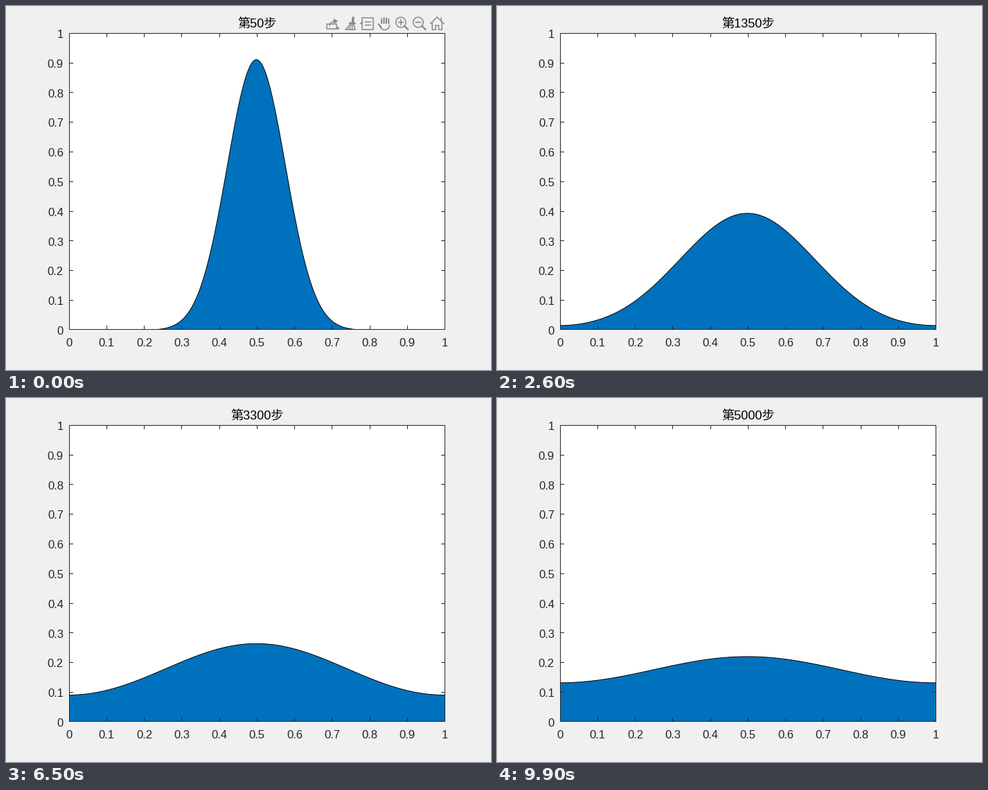
These frames come from a looping animation (700x525 px, 10000 ms). A matplotlib script:

```python
import numpy as np
import matplotlib.pyplot as plt
from matplotlib.animation import FuncAnimation
from matplotlib.patches import Arc, Circle, Polygon, Rectangle, RegularPolygon

W, H, DPI = 700, 525, 100
PX = 72 / DPI  # points per pixel
FRAMES, INTERVAL, STEPS = 100, 100, 50

# Plot box in pixels, y pointing down
LEFT, TOP, WIDTH, HEIGHT = 91, 39, 542.5, 427.875
BASE = 467.75
INK, GREY, BLUE = "#262626", "#888888", "#0072bd"

plt.rcParams["font.family"] = ["Liberation Sans", "Noto Sans CJK JP"]

fig = plt.figure(figsize=(W / DPI, H / DPI), dpi=DPI, facecolor="#f0f0f0")
ax = fig.add_axes([0, 0, 1, 1])
ax.set(xlim=(0, W), ylim=(H, 0))
ax.axis("off")


def stroke(xs, ys, color=INK, width=1, cap="butt"):
    line, = ax.plot(xs, ys, color=color, lw=width * PX, zorder=4,
                    solid_capstyle=cap, snap=False)
    return line


def label(x, y, s, size=16.67, color=INK, ha="center"):
    return ax.text(x, y, s, fontsize=size * PX, color=color, ha=ha,
                   va="baseline", zorder=5)


def draw_axes():
    x0, x1, y0, y1 = 91.5, 633.5, 39.5, 466.5
    ax.add_patch(Rectangle((LEFT, TOP), 543, 428, fc="white", ec="none",
                           zorder=1, snap=False))
    ax.add_patch(Rectangle((x0, y0), x1 - x0, y1 - y0, fc="none", ec=INK,
                           lw=PX, zorder=4, snap=False))
    for k in range(11):
        text = f"{k / 10:g}"
        tx = LEFT + WIDTH * k / 10
        ty = 467.25 - HEIGHT * k / 10
        label(tx, 491, text)
        label(83, ty + 6.7, text, ha="right")
        if 0 < k < 10:
            cx, cy = int(tx) + 0.5, int(ty) + 0.5
            for edge, d in ((y0, 5.5), (y1, -5.5)):
                stroke([cx, cx], [edge, edge + d])
            for edge, d in ((x0, 5.5), (x1, -5.5)):
                stroke([edge, edge + d], [cy, cy])


def draw_toolbar():
    """Seven evenly spaced icons, each built around its own centre."""
    parts = []
    export, brush, tip, hand, zoom_in, zoom_out, home = 471 + 25.2 * np.arange(7)
    cy = 25

    def bar(cx, xa, ya, xb, yb, width=1.5):
        parts.append(stroke([cx + xa, cx + xb], [cy + ya, cy + yb],
                            GREY, width, "round"))

    def shape(patch, fill=False):
        patch.set(fc=GREY if fill else "none", ec="none" if fill else GREY,
                  lw=1.5 * PX, zorder=4)
        parts.append(ax.add_patch(patch))

    def box(cx, x, y, w, h):
        shape(Rectangle((cx + x, cy + y), w, h))

    def arrow(x, y, r, turn):
        shape(RegularPolygon((x, y), 3, radius=r, orientation=turn), fill=True)

    box(export, -8, 1, 14, 7)
    shape(Arc((export + 4, cy + 4), 16, 14, theta1=180, theta2=270))
    arrow(export + 4, cy - 3, 4.5, -np.pi / 2)
    arrow(export + 8, cy + 7, 3, -np.pi / 4)

    bar(brush, 5, -8, 4, 0, 3.5)
    bar(brush, 0, 0, 7, 0, 3)
    bar(brush, -6, 9, 8, 9)
    for k in range(4):
        bar(brush, 2 * k, 2, 4.5 * k - 6, 9)

    box(tip, -7, -8.5, 16, 17.5)
    arrow(tip - 8, cy, 3, np.pi / 2)
    for y in (-2, 2.5):
        bar(tip, -3, y, 5, y)

    shape(Arc((hand, cy + 2), 14, 15, theta1=0, theta2=180))
    bar(hand, -9, 1, -5, 6, 2)
    for k in range(4):
        x = 3.4 * k - 4.5
        bar(hand, x, 0, x, 1.5 * abs(k - 1.4) - 8.5, 2)

    for cx in (zoom_in, zoom_out):
        shape(Circle((cx - 2, cy - 1.5), 7.3))
        bar(cx, 3.5, 4, 8.5, 9, 2.3)
        bar(cx, -5.7, -1.5, 1.7, -1.5, 1.7)
    bar(zoom_in, -2, -5.2, -2, 2.2, 1.7)

    for side in (-1, 1):
        bar(home, 0, -9, 9.7 * side, 0.5)
        bar(home, 7 * side, -1, 7 * side, 9)
        bar(home, 7 * side, 9, 2.3 * side, 9)
        bar(home, 2.3 * side, 9, 2.3 * side, 3)
    bar(home, -2.3, 3, 2.3, 3)
    bar(home, 6, -8, 6, -4)
    return parts


def density(x, n):
    """Gaussian pulse after n diffusion steps on a periodic unit interval."""
    var = 0.005 + 2.01e-5 * n
    return sum(np.sqrt(0.005 / var) * np.exp(-(x - 0.4975 + k) ** 2 / (2 * var))
               for k in range(-2, 3))


draw_axes()
toolbar = draw_toolbar()
title = label(LEFT + WIDTH / 2, 32, "", 18.2, "black")
area = Polygon([(0, 0)], fc=BLUE, ec="black", lw=PX, zorder=2, snap=False)
ax.add_patch(area)
area.set_clip_path(Rectangle((LEFT, TOP), 543, 428, transform=ax.transData))
grid = np.linspace(0, 1, 201)


def update(i):
    n = STEPS * (i + 1)
    xs = LEFT + 0.5 + WIDTH * grid
    ys = BASE - HEIGHT * density(grid, n)
    curve = np.column_stack([xs, ys])
    area.set_xy(np.vstack([[xs[0], BASE], curve, [xs[-1], BASE]]))
    title.set_text(f"第{n}步")
    for part in toolbar:
        part.set_visible(i == 0)
    return [area, title, *toolbar]


anim = FuncAnimation(fig, update, frames=FRAMES, interval=INTERVAL,
                     repeat=True, repeat_delay=0, blit=False)
plt.show()
```
